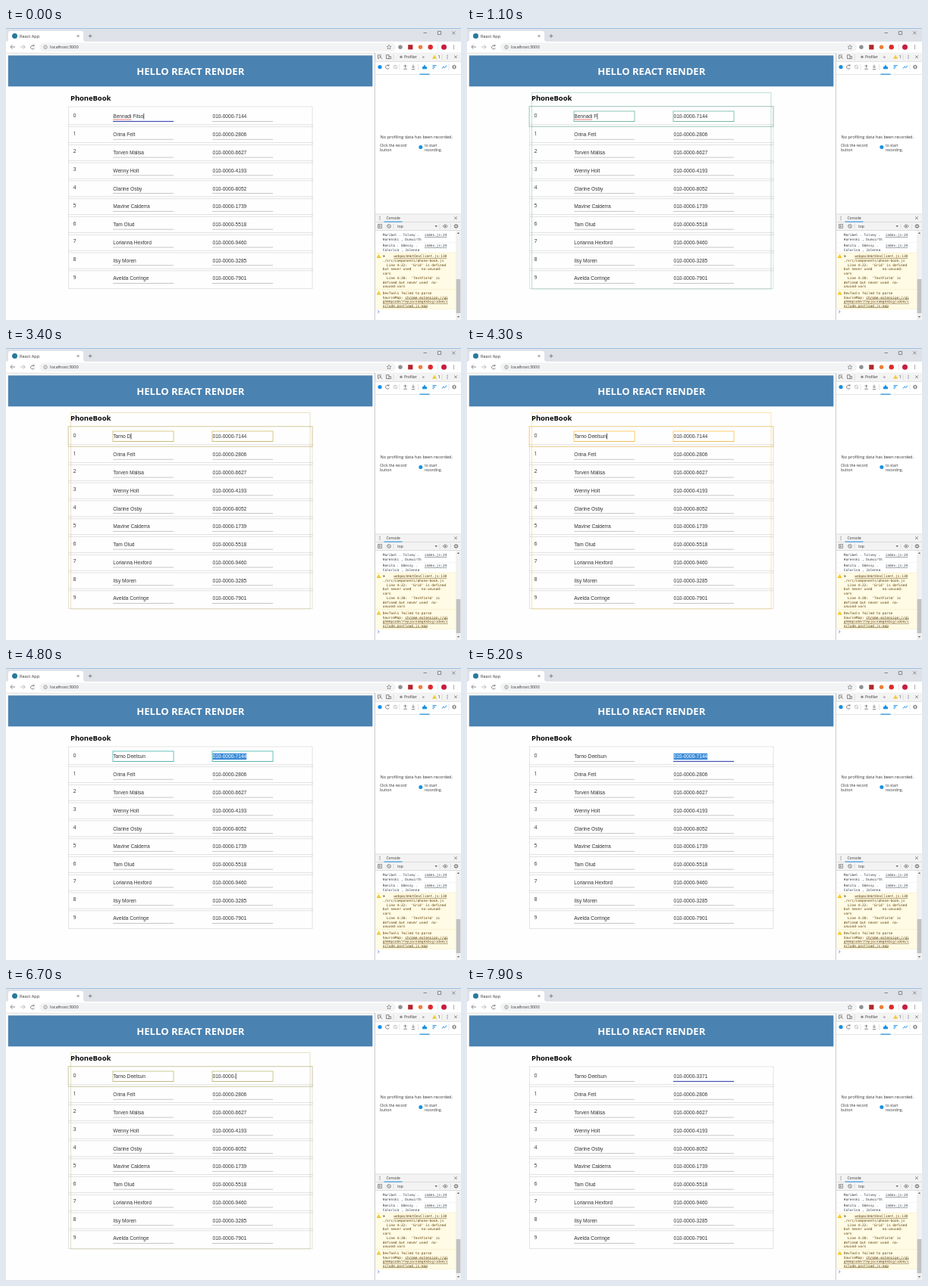
These frames come from a looping animation (600x386 px, 8000 ms). An HTML page:

```html
<!DOCTYPE html>
<html lang="en">
<head>
<meta charset="utf-8">
<title>Phone book render</title>
<style>
  html, body { margin: 0; height: 100%; overflow: hidden; background: #fff; }
  svg { display: block; width: 100vw; height: 100vh; }
  text { white-space: pre; font-family: "Open Sans", sans-serif; font-size: 5.6px; fill: #333; }
  .title { font-size: 13.1px; font-weight: 700; fill: #fff; text-anchor: middle; }
  .heading { font-size: 9.4px; font-weight: 700; fill: #000; }
  .index { font-size: 7px; }
  .field { font: 6.6px "Liberation Sans", Arial, sans-serif; fill: #333; }
  .small { font-size: 4.9px; }
  .mono { font: 4.48px "DejaVu Sans Mono", monospace; fill: #303942; }
  .warn { fill: #5c3c00; }
  .link { text-decoration: underline; }
  .end { text-anchor: end; }
  .mid { text-anchor: middle; }
</style>
</head>
<body>
<svg id="stage" viewBox="0 0 600 386" preserveAspectRatio="none"></svg>
<script>
const LOOP = 8000, ROW_PITCH = 23.78, NAME_X = 141.3, PHONE_X = 272.5;
const BLUE = '#1a8fe3', GRAY = '#6e6e6e', LINE = '#d0d0d0';
const HEAT = ['#37afa9', '#63b19e', '#80b393', '#97b488', '#abb67d',
              '#beb771', '#cfb965', '#dfba57', '#efbb49', '#febc38'];
const OLD_NAME = 'Bennadi Filso', NEW_NAME = 'Tarno Deelsun', TYPO = 'Ts';
const OLD_PHONE = '010-0000-7144', NEW_PHONE = '010-0000-3371';
const people = [
  [OLD_NAME, OLD_PHONE], ['Orina Felt', '010-0000-2806'], ['Torven Malisa', '010-0000-6627'],
  ['Wenny Holt', '010-0000-4193'], ['Clarine Osby', '010-0000-8052'],
  ['Mavine Calderra', '010-0000-1739'], ['Tam Olud', '010-0000-5518'],
  ['Lorianna Hexford', '010-0000-9460'], ['Ilsy Moren', '010-0000-3285'],
  ['Avelda Corringe', '010-0000-7901']
];

// Markup helpers
const attrs = o => Object.entries(o).map(([k, v]) => ` ${k}="${v}"`).join('');
const text = (x, y, s, cls = '', more = {}) =>
  `<text${attrs({ x, y, class: cls, ...more })}>${s}</text>`;
const rect = (x, y, width, height, fill, more = {}) =>
  `<rect${attrs({ x, y, width, height, fill, ...more })}/>`;
const dot = (cx, cy, r, fill, more = {}) => `<circle${attrs({ cx, cy, r, fill, ...more })}/>`;
const path = (d, stroke = GRAY, width = .8, more = {}) =>
  `<path${attrs({ d, stroke, 'stroke-width': width, fill: 'none', ...more })}/>`;
const frame = (id, x, y, w, h) => rect(x, y, w, h, 'none', { id, 'stroke-width': 1 });
const cross = (x, y, r) => path(`M${x - r} ${y - r}l${2 * r} ${2 * r}m0 ${-2 * r}l${-2 * r} ${2 * r}`);
const menu = (x, y) => [-2, 0, 2].map(d => dot(x, y + d, .6, GRAY)).join('');
const gear = (x, y) => dot(x, y, 1.8, 'none', { stroke: GRAY, 'stroke-width': 1.1 }) +
  dot(x, y, 2.7, 'none', { stroke: GRAY, 'stroke-width': .7, 'stroke-dasharray': '1 1.1' });
const reload = (x, y) => path(`M${x + 2} ${y - 1.5}a2.5 2.5 0 1 0 .4 2.5m-.4 -4.5v2h-2`);
const warning = (x, y) => path(`M${x} ${y - 2.5}l2.8 5h-5.6z`, 'none', 0, { fill: '#f4bd00' }) +
  path(`M${x} ${y - .8}v1.6m0 .5v.6`, '#fff', .6);

function browser() {
  return rect(0, 0, 600, 18, '#dee2e8') + rect(0, 0, 600, .7, '#7fb2e5') +
    path('M0 18q3 0 3-3V7q0-3 3-3h93q3 0 3 3v8q0 3 3 3z', 'none', 0, { fill: '#fff' }) +
    dot(11.5, 10.6, 3.5, '#28789c') + text(18, 12.6, 'React App') +
    cross(95, 10.6, 1.5) + path('M108.5 10.6h5m-2.5-2.5v5') +
    path('M550.5 6.5h4.5') + path('M569.4 4.4h4.2v4.2h-4.2z') + cross(590.3, 6.5, 2) +
    rect(0, 18, 600, 15, '#fff') + rect(44, 19.5, 470, 11.5, '#f1f3f4', { rx: 5.7 }) +
    path('M12 25H6m2.5-2.7L5.8 25l2.7 2.7') + path('M19 25h6m-2.5-2.7L25.2 25l-2.7 2.7', '#aaa') +
    reload(35, 25.3) + dot(52, 25.2, 2.3, 'none', { stroke: GRAY, 'stroke-width': .6 }) +
    path('M52 24.8v1.7m0-2.8v.5', GRAY, .6) + text(58, 27.1, 'localhost:3000') +
    path('M505 22.3l.9 1.9 2.1.2-1.6 1.4.5 2.1-1.9-1.1-1.9 1.1.5-2.1-1.6-1.4 2.1-.2z', GRAY, .6) +
    dot(520, 25.2, 2.7, '#8a8f94') + rect(530.2, 22.2, 6.2, 6.2, '#b3262a') +
    dot(546.5, 25.2, 2.7, '#ee7f35') + dot(559.7, 25.2, 3.2, '#d92a2a') +
    path('M569.5 21v8', LINE, .6) + dot(577.5, 25.2, 3.5, '#c61c40') + menu(590.5, 25.2) +
    path('M0 33.3h600', LINE, .7);
}

function phoneBook() {
  const row = ([name, phone], i) => {
    const y = i * ROW_PITCH, first = i === 0;
    return rect(82.5, 104 + y, 321.5, 26.6, 'none', { stroke: '#dcdcdc', 'stroke-width': .8 }) +
      text(88.5, 117.9 + y, i, 'index') +
      text(NAME_X, 119.4 + y, name, 'field', first ? { id: 'name' } : {}) +
      (first ? rect(PHONE_X, 112.8, 44.7, 8.4, '#3a8ad8', { id: 'selection' }) : '') +
      text(PHONE_X, 119.4 + y, phone, 'field', first ? { id: 'phone' } : {}) +
      path(`M141 ${123.5 + y}h80m51 0h80`, '#a0a0a0', .6);
  };
  return rect(2.8, 36.3, 480.5, 41, '#4a82b1') + text(243.3, 62.2, 'HELLO REACT RENDER', 'title') +
    text(85, 95.6, 'PhoneBook', 'heading') + people.map(row).join('') +
    path('', '#e03030', .7, { id: 'squiggle' }) + rect(141, 122.9, 80, 1.2, '#3f51b5', { id: 'focus' }) +
    frame('listBox', 85.5, 85.5, 315.5, 259.5) + frame('rowBox', 82, 103.5, 322, 26.8) +
    frame('nameBox', 141, 110, 80, 13.5) + frame('phoneBox', 272, 110, 80, 13.5) +
    rect(0, 113, .7, 7.5, '#111', { id: 'caret' });
}

function profiler() {
  return rect(486, 33.3, 114, 353, '#fff') + rect(486, 33.3, 114, 11, '#f3f3f3') +
    path('M486.4 33v353', '#bbb', .8) + path('M486 44.4h114M486 61.5h114', LINE, .6) +
    path('M495 35.8h-4.5v4.5h1.5m1-2.5l3 3m-3-1v-2h2') + path('M501.5 35.6h3.5v5h-3.5zm3.5 2h2.5v3h-2.5') +
    path('M511 35v7.5M575 35v7.5', LINE, .6) + dot(521, 38.2, 1.7, '#8a8f94') +
    text(525, 40, 'Profiler', 'small') + text(549, 40, '»') +
    warning(565, 38) + text(569.5, 40, '1') + menu(582, 38.2) + cross(593, 38.2, 1.8) +
    dot(493, 51.5, 2.6, BLUE) + reload(503, 51.5) +
    dot(513.5, 51.5, 2.4, 'none', { stroke: '#bbb', 'stroke-width': .8 }) + path('M511.9 49.9l3.2 3.2', '#bbb') +
    path('M519 47.5v8M543.5 47.5v8M584 47.5v8', LINE, .6) +
    path('M526.5 53v-4m-1.8 1.8l1.8-2 1.8 2m-4 3.5h4.5') + path('M537 48.5v4m-1.8-1.8l1.8 2 1.8-2m-4 3.8h4.5') +
    path('M549 54.2v-2.7l1.8-1 1.2-2.2 1.2 2.5 1.8 1v2.4z', 'none', 0, { fill: BLUE }) +
    rect(545.5, 60.5, 13, 1.2, BLUE) + path('M562.5 49.5h5m-5 2h3.5m-3.5 2h2', BLUE, 1) +
    path('M575 53.5l2-2.5 1.7 1.5 2.3-3', BLUE, 1) + gear(591, 51.5) +
    text(541.3, 146, 'No profiling data has been recorded.', 'mid') +
    text(493, 157, 'Click the record', 'small') + text(493, 163.2, 'button', 'small') +
    dot(546.8, 157.6, 2.5, BLUE) +
    text(552, 157, 'to start', 'small') + text(552, 163.2, 'recording.', 'small');
}

function consolePanel() {
  const lines = [
    [275.3, 'Maribel . Tolvey .'], [281, 'Harenski , Dunwirth'],
    [289.3, 'Renita . Odessy .'], [295, 'Calorisa , Jolenna'],
    [309.3, './src/components/phone-book.js', 'warn'],
    [314.7, "  Line 4:22:  'Grid' is defined", 'warn'], [320.2, 'but never used     no-unused-', 'warn'],
    [325.7, 'vars', 'warn'], [332.3, "  Line 4:28:  'TextField' is", 'warn'],
    [337.8, 'defined but never used  no-', 'warn'], [343.2, 'unused-vars', 'warn'],
    [352, 'DevTools failed to parse', 'warn'],
    [357.5, 'SourceMap: <tspan class="link">chrome-extension://gi</tspan>', 'warn'],
    [363, 'ghmmpiobklfepjocnamgkkbiglidom/i', 'warn link'], [368.5, 'nclude.postload.js.map', 'warn link']
  ];
  return rect(487, 246, 113, 21.5, '#f3f3f3') + path('M487 246h113M487 256.5h113M487 267.5h113', LINE, .7) +
    menu(493, 251.3) + text(501.5, 253, 'Console', 'small') + rect(498.5, 255.6, 24, 1, BLUE) + cross(593, 251.3, 1.8) +
    path('M490.5 259.5h5v5h-5zm1.6 1.2v2.6l2-1.3z', GRAY, .7) +
    dot(505, 262, 2.4, 'none', { stroke: GRAY, 'stroke-width': .8 }) + path('M503.4 260.4l3.2 3.2') +
    path('M511 258.5v7M572 258.5v7M586.5 258.5v7', LINE, .6) + text(516, 263.8, 'top', 'small') +
    path('M565.5 261h3.4l-1.7 2.4z', 'none', 0, { fill: GRAY }) +
    path('M576 262q3.2-4 6.4 0q-3.2 4-6.4 0z') + dot(579.2, 262, 1, GRAY) + gear(593.5, 262) +
    rect(487, 297.3, 106, 74, '#fffbe5') + path('M487 283.7h106', '#eee', .6) +
    path('M487 297.3h106M487 345.7h106M487 371.3h106', '#f3e8b8', .6) +
    warning(491.5, 301.6) + warning(491.5, 350) +
    path('M497.5 300l2.6 1.6-2.6 1.6z', 'none', 0, { fill: GRAY }) +
    lines.map(([y, s, cls = '']) => text(496.7, y, s, 'mono ' + cls)).join('') +
    text(581.3, 275.3, 'index.js:24', 'mono link end') + text(581.3, 289.3, 'index.js:24', 'mono link end') +
    text(581.3, 303.2, 'webpackHotDevClient.js:138', 'mono link end warn') +
    path('M490.3 373.4l1.8 1.7-1.8 1.7', '#3b78e7', .8) +
    rect(593, 268, 7, 118, '#f1f1f1') + rect(593.7, 332, 5.6, 45, '#c1c1c1') +
    path('M594.8 272l1.7-2 1.7 2zM594.8 381l1.7 2 1.7-2z', 'none', 0, { fill: GRAY });
}

// Keystroke timeline
const keys = [];
const press = (at, field, value) => keys.push({ at, field, value });
const type = (field, word, from, to, start, step) => {
  const direction = Math.sign(to - from);
  for (let i = 0; i <= Math.abs(to - from); i++) {
    press(start + i * step, field, word.slice(0, from + i * direction));
  }
};
type('name', OLD_NAME, 12, 11, 630, 90);
type('name', OLD_NAME, 10, 0, 980, 100);
press(2200, 'name', TYPO[0]);
press(2420, 'name', TYPO);
type('name', NEW_NAME, 1, 6, 2730, 100);
type('name', NEW_NAME, 7, 13, 3350, 140);
press(4700, 'tab');
type('phone', NEW_PHONE, 1, 3, 5280, 120);
type('phone', NEW_PHONE, 4, 13, 5950, 140);
keys.forEach((k, i) => {
  const previous = keys[i - 1];
  k.streak = previous && k.at - previous.at < 250 ? previous.streak + 1 : 1;
});

const stage = document.getElementById('stage');
stage.innerHTML = rect(0, 0, 600, 386, '#fefefe') + browser() + phoneBook() + profiler() + consolePanel();
const el = Object.fromEntries([...stage.querySelectorAll('[id]')].map(e => [e.id, e]));
const show = (e, on) => e.setAttribute('visibility', on ? 'visible' : 'hidden');

function outline(box, on, color, opacity) {
  show(box, on);
  box.setAttribute('stroke', color);
  box.setAttribute('stroke-opacity', opacity);
}

function render(t) {
  const past = keys.filter(k => k.at <= t);
  const last = past[past.length - 1];
  const valueOf = (field, initial) => past.filter(k => k.field === field).pop()?.value ?? initial;
  const name = valueOf('name', OLD_NAME), phone = valueOf('phone', OLD_PHONE);
  const onPhone = t >= 4700, selected = last?.field === 'tab';
  el.name.textContent = name;
  el.phone.textContent = phone;
  el.phone.style.fill = selected ? '#fff' : '';
  show(el.selection, selected);
  el.focus.setAttribute('x', onPhone ? 272 : 141);

  const age = last ? t - last.at : Infinity;
  const color = HEAT[Math.min(last ? last.streak : 1, HEAT.length) - 1];
  outline(el.listBox, age < 250 && !selected, color, .4);
  outline(el.rowBox, age < 250 && !selected, color, .5);
  outline(el.nameBox, age < (onPhone ? 250 : 300), color, .75);
  outline(el.phoneBox, age < (onPhone ? 300 : 250), color, .75);
  show(el.focus, age >= 300);

  const active = onPhone ? el.phone : el.name;
  const width = active.textContent ? active.getComputedTextLength() : 0;
  el.caret.setAttribute('x', (onPhone ? PHONE_X : NAME_X) + width + .2);
  show(el.caret, !selected && name !== TYPO && (t - (last?.at ?? 0)) % 1000 < 500);

  const misspelled = OLD_NAME.startsWith(name) && name.length >= 7;
  show(el.squiggle, misspelled);
  if (misspelled) {
    const waves = Math.floor(el.name.getSubStringLength(0, 7) / 2);
    el.squiggle.setAttribute('d', `M${NAME_X} 121.4` + 'l1 -.7l1 .7'.repeat(waves));
  }
}

function tick() {
  render(Math.floor(performance.now() % LOOP / 100) * 100);
  requestAnimationFrame(tick);
}
tick();
</script>
</body>
</html>
```
